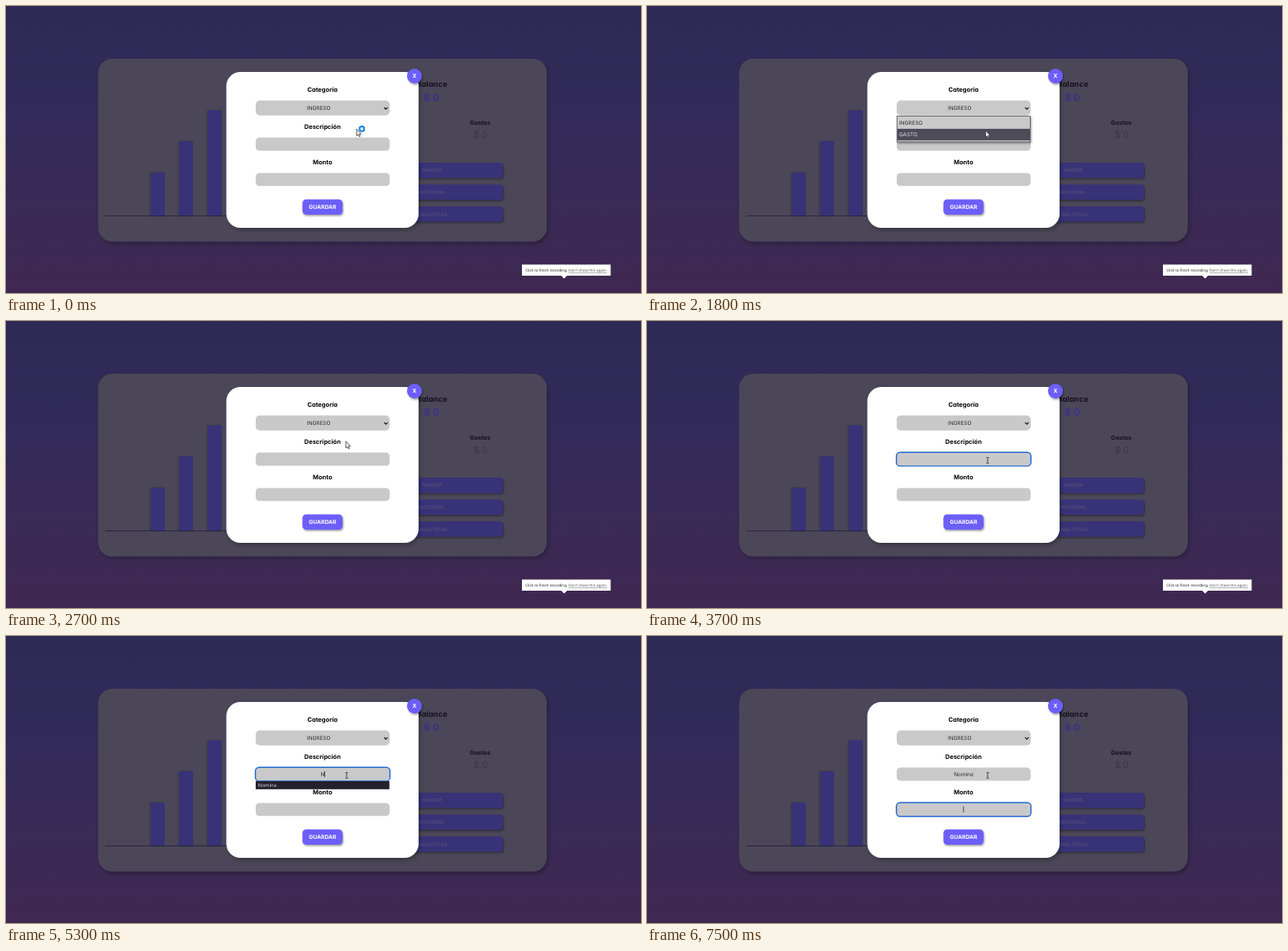
An HTML page for the animation above (8 s loop, 768x348 px).

```html
<!DOCTYPE html>
<html lang="es">
<head>
<meta charset="utf-8">
<title>Balance</title>
<style>
html, body { margin: 0; width: 100%; height: 100%; overflow: hidden; background: #2d2a55; }
svg { display: block; width: 100%; height: 100%; }
text {
  font-family: Inter, "Open Sans", sans-serif;
  font-feature-settings: "cv11";
  text-rendering: geometricPrecision;
}
.mid { text-anchor: middle; }
.bold { font-weight: 700; }
.label { font-size: 7.5px; font-weight: 700; fill: #080808; text-anchor: middle; }
.value { font-size: 6.4px; fill: #2c2a35; }
.system { font-family: "Noto Sans", "Open Sans", sans-serif; }
.field { fill: #c9c9c9; }
.dim { fill: #373078; }
.dimText { font-size: 6.2px; font-weight: 700; fill: #514a78; text-anchor: middle; }
.brand { fill: #6c5ff9; }
.ring { fill: none; stroke: #1f66cf; stroke-width: 1.4; }
.caret { stroke: #25232c; stroke-width: .8; }
</style>
</head>
<body>
<svg viewBox="0 0 768 348" preserveAspectRatio="none">
  <defs>
    <linearGradient id="sky" x1="0" y1="0" x2="0" y2="1">
      <stop offset="0" stop-color="#2d2a55"/>
      <stop offset=".4" stop-color="#332b5a"/>
      <stop offset="1" stop-color="#3f2851"/>
    </linearGradient>
    <filter id="soft" x="-20%" y="-20%" width="140%" height="150%">
      <feDropShadow dx="2" dy="3" stdDeviation="2.5" flood-color="#000" flood-opacity=".25"/>
    </filter>
    <filter id="lift" x="-20%" y="-30%" width="140%" height="190%">
      <feDropShadow dx="1" dy="1.5" stdDeviation="1.2" flood-color="#000" flood-opacity=".4"/>
    </filter>
    <filter id="side" x="-40%" y="-10%" width="180%" height="120%">
      <feDropShadow dx="-1" dy="0" stdDeviation="1" flood-color="#000" flood-opacity=".25"/>
    </filter>
  </defs>

  <rect width="768" height="348" fill="url(#sky)"/>
  <rect x="111.5" y="64" width="542.5" height="221.5" rx="17" fill="#4c4759" filter="url(#soft)"/>

  <g class="dim" filter="url(#side)">
    <rect x="175" y="202" width="17" height="52.5"/>
    <rect x="209.5" y="164" width="16.7" height="90.5"/>
    <rect x="244" y="126.5" width="16.7" height="128"/>
  </g>
  <path d="M120 254.5H300" stroke="#2a2544"/>

  <text class="mid bold" x="515" y="98.4" font-size="9.4" fill="#15131d">Balance</text>
  <text class="mid bold" x="514.5" y="115.4" font-size="12" fill="#3a338a">$ 0</text>
  <text class="mid bold" x="573.5" y="144.3" font-size="7.2" fill="#15131d">Gastos</text>
  <text class="mid" x="574" y="160" font-size="11" fill="#3b3746">$ 0</text>
  <g class="dim" filter="url(#lift)">
    <rect x="428" y="190" width="173" height="18.6" rx="4"/>
    <rect x="428" y="216.5" width="173" height="18.6" rx="4"/>
    <rect x="428" y="243" width="173" height="18.6" rx="4"/>
  </g>
  <text class="dimText" x="515" y="201.3">AÑADIR</text>
  <text class="dimText" x="515" y="227.9">HISTORIAL</text>
  <text class="dimText" x="515" y="254.5">ANALITICAS</text>

  <rect x="266.5" y="80" width="232.5" height="189" rx="17" fill="#fff" filter="url(#soft)"/>
  <circle class="brand" cx="494" cy="85" r="9" filter="url(#lift)"/>
  <text class="mid bold" x="494" y="87.4" font-size="6.8" fill="#fff">X</text>

  <text class="label" x="382.7" y="103.6">Categoría</text>
  <rect class="field" x="302" y="114.5" width="162" height="18.3" rx="5"/>
  <text class="value mid" x="378.2" y="126.2">INGRESO</text>
  <path d="M457.3 123l2.1 2.1 2.1-2.1" fill="none" stroke="#17161c" stroke-width="1.1"/>

  <text class="label" x="382.8" y="148.7">Descripción</text>
  <rect class="field" x="302" y="159.6" width="162" height="15.9" rx="4.5"/>
  <text id="typed" class="value mid" x="383" y="170.3"></text>

  <text class="label" x="382.8" y="191.5">Monto</text>
  <rect class="field" x="302" y="202.4" width="162" height="15.9" rx="4.5"/>

  <rect class="brand" x="358.5" y="234.5" width="48.5" height="18.5" rx="4.5" filter="url(#lift)"/>
  <text class="mid bold" x="382.8" y="246.2" font-size="6.7" fill="#fff">GUARDAR</text>

  <rect id="ring" class="ring" x="301.6" width="162.8" height="16.7" rx="4.5"/>
  <path id="caret" class="caret"/>

  <g id="menu">
    <rect x="302.3" y="133.4" width="161.2" height="31.4" fill="#c9c9c9" stroke="#55535c" stroke-width=".8" filter="url(#lift)"/>
    <rect id="hover" x="302.7" width="160.4" height="14" fill="#4d4b57"/>
    <text id="optA" class="value" x="305" y="144.3">INGRESO</text>
    <text id="optB" class="value" x="305" y="158.4">GASTO</text>
  </g>

  <g id="hint">
    <rect x="302" y="176" width="161.7" height="9.8" fill="#24202c"/>
    <text class="system" x="304.6" y="183.1" font-size="6" fill="#d8d7dc">Nomina</text>
  </g>

  <g id="notice" class="system">
    <path d="M624 313.5H731.3V327H678.5L675 330.6 671.5 327H624Z" fill="#fff"/>
    <text class="system" x="628.3" y="322" font-size="4.5" fill="#222">Click to finish recording.</text>
    <text class="system" x="680.3" y="322" font-size="4.5" fill="#555" text-decoration="underline">Don't show this again.</text>
  </g>

  <g id="arrow">
    <path d="M0 0V8.2L1.9 6.5 3.2 9.2 4.4 8.6 3.2 6H5.6Z" fill="#f4f4f6" stroke="#222029" stroke-width=".7" stroke-linejoin="round"/>
    <circle id="busy" cx="6.4" cy="-.4" r="2.9" fill="#d6efff" stroke="#1f86dc" stroke-width="2"/>
  </g>
  <path id="beam" d="M410.4 165.6H411.5Q412 165.6 412 166.2V171.8Q412 172.4 411.5 172.4H410.4M413.6 165.6H412.5Q412 165.6 412 166.2M412 171.8Q412 172.4 412.5 172.4H413.6" fill="none" stroke="#24222a" stroke-width=".8"/>
</svg>
<script>
const LOOP = 8000;
const $ = id => document.getElementById(id);
const show = (id, on) => { $(id).style.display = on ? '' : 'none'; };
const within = (t, a, b) => t >= a && t < b;

// Latest step at or before t; each step is [time, ...values].
const at = (steps, t) => steps.filter(s => s[0] <= t).pop();

const pointer = [
  [0, 424, 149.3], [1000, 409.5, 125.5],
  [1500, 409.5, 130], [1600, 409.5, 137], [1700, 409.5, 144], [1800, 409.5, 151], [1900, 409.5, 153],
  [2100, 409.5, 155], [2200, 410, 151], [2300, 410.5, 147], [2400, 411, 145.8],
  [2800, 411.3, 150], [2900, 411.8, 156]
];
const typing = [
  [0, ''], [5200, 'N'], [5400, 'No'], [5700, 'Nom'],
  [5800, 'Nomi'], [5900, 'Nomin'], [6100, 'Nomina']
];
const blink = [
  [0, false], [3100, true], [3700, false], [4200, true], [4700, false],
  [5200, true], [6900, false], [7500, true]
];

function draw(t) {
  const [, x, y] = at(pointer, t);
  const onBeam = t >= 3000;
  show('arrow', !onBeam);
  show('beam', onBeam);
  show('busy', t < 1000);
  $('arrow').setAttribute('transform', `translate(${x} ${y})`);

  const second = y >= 148.8;
  show('menu', within(t, 1100, 2700));
  $('hover').setAttribute('y', second ? 148.9 : 134.8);
  $('optA').style.fill = second ? '' : '#e0dfe4';
  $('optB').style.fill = second ? '#e0dfe4' : '';

  $('typed').textContent = at(typing, t)[1];
  show('hint', within(t, 5300, 6400));
  show('notice', t < 4900);

  const lower = t >= 6400;
  show('ring', t >= 3100);
  $('ring').setAttribute('y', lower ? 202 : 159.2);
  show('caret', at(blink, t)[1]);
  const caretX = lower ? 382.8 : 383 + $('typed').getComputedTextLength() / 2;
  $('caret').setAttribute('d', `M${caretX} ${lower ? 206.6 : 164}v7.2`);
}

const start = performance.now();
function tick() {
  draw((performance.now() - start) % LOOP);
  requestAnimationFrame(tick);
}
tick();
</script>
</body>
</html>
```
